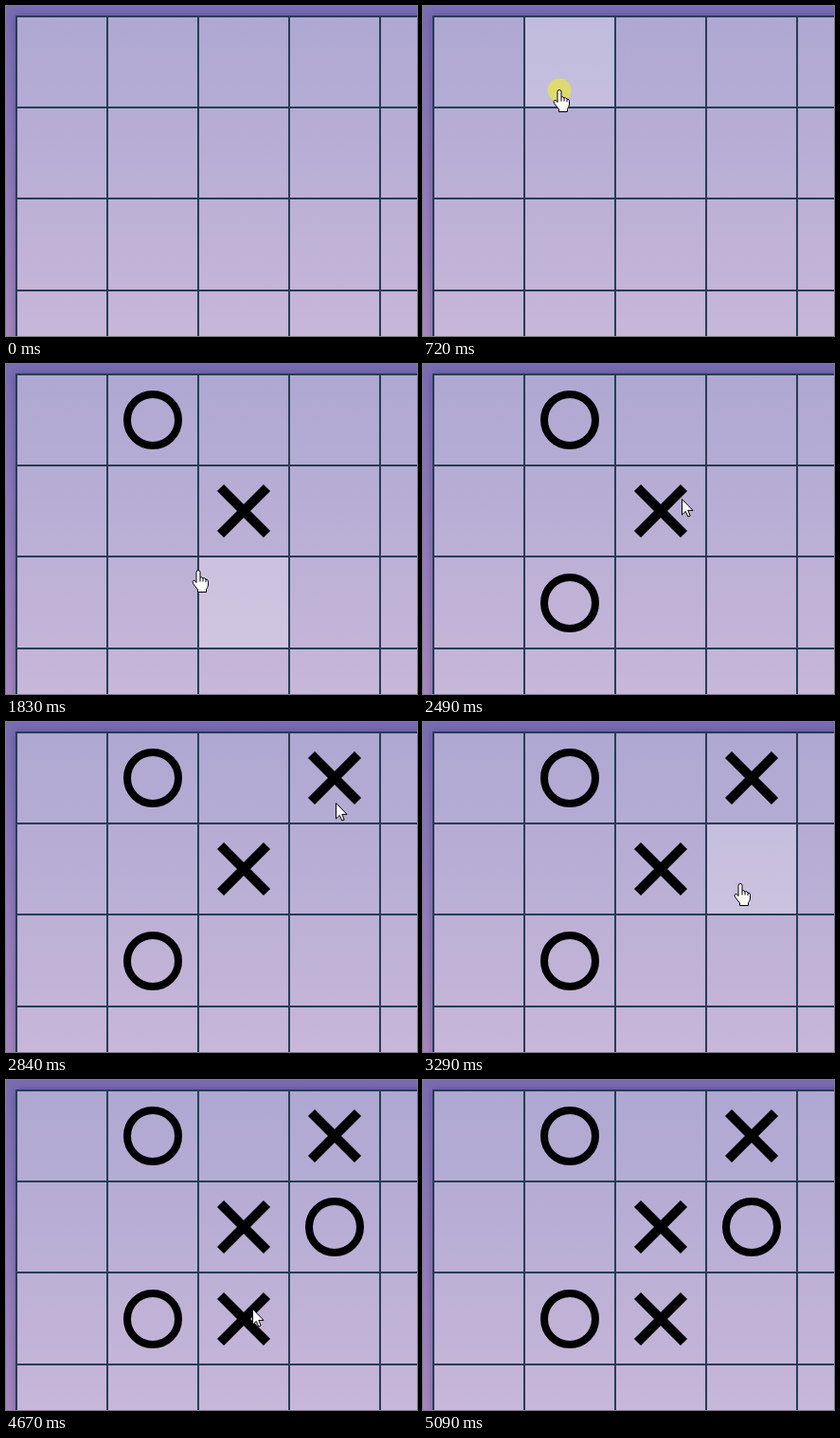
Write an HTML page that moves like this. It is 434x348 px and loops after 5.68 s.

```html
<!DOCTYPE html>
<html lang="en">
<head>
<meta charset="utf-8">
<title>Noughts and crosses</title>
<style>
  html, body { margin: 0; width: 100%; height: 100%; overflow: hidden; }
  svg { display: block; width: 100%; height: 100%; overflow: hidden; }
  #shade { filter: blur(4.5px); }
</style>
</head>
<body>
<svg viewBox="0 0 434 348" preserveAspectRatio="xMinYMin slice">
  <defs>
    <linearGradient id="page" x2="0" y2="1">
      <stop stop-color="#786cb3"/>
      <stop offset="1" stop-color="#a688be"/>
    </linearGradient>
    <linearGradient id="board" x2="0" y2="1">
      <stop stop-color="#aea8d2"/>
      <stop offset=".5" stop-color="#baafd5"/>
      <stop offset="1" stop-color="#c7b7d9"/>
    </linearGradient>
  </defs>
  <rect width="434" height="348" fill="url(#page)"/>
  <rect id="shade" x="10" y="10" width="450" height="370" fill="#2d236e" fill-opacity=".4"/>
  <rect x="10" y="10" width="424" height="338" fill="url(#board)"/>
  <rect id="hover" width="94" height="95" fill="#fff" fill-opacity=".22"/>
  <path id="grid" stroke="#263d55" stroke-width="2"/>
  <g id="marks" fill="none" stroke="#000"></g>
  <circle id="press" r="12.5" fill="#dedb6e"/>
  <g id="hand" fill="#fff" stroke="#000" stroke-linejoin="round">
    <path d="M-2 1.5Q-2 -.5 0 -.5T2 1.5V7Q4 6 5 8Q7 7 8 9Q10.5 8.8 10.5 11.5
             V15Q10 18 8.5 19.5V22.5H-.5V20L-5.5 13.5Q-6.5 11 -5 10.3Q-3.5 10 -2 12.5Z"/>
    <path d="M2 7V11.5M5 8V11.5M8 9V12" fill="none"/>
  </g>
  <path id="arrow" d="M.5 .5V17L4.3 13.4L6.8 19L9.2 18L6.8 12.4H12Z" fill="#fff" stroke="#000"/>
</svg>
<script>
const LOOP = 5680, PRESS = 100, COL = 96, ROW = 96.34;
const $ = id => document.getElementById(id);
const [hover, press, hand, arrow] = ['hover', 'press', 'hand', 'arrow'].map($);

const lineX = col => 11 + COL * col;
const lineY = row => Math.floor(11 + ROW * row);
const cellAt = (x, y) => [Math.floor((x - 11) / COL), Math.floor((y - 11) / ROW)];
const ease = k => k * k * (3 - 2 * k);

// Each glide runs from the previous stop; a press comes just before the next one leaves.
const origin = { x: 220, y: 301 };
const glides = [
  { leave: 230, arrive: 470, x: 144, y: 89, bend: 0 },
  { leave: 820, arrive: 1220, x: 252, y: 150, bend: 0 },
  { leave: 1530, arrive: 2060, x: 157, y: 250, bend: -12 },
  { leave: 2170, arrive: 2720, x: 348, y: 84, bend: -6 },
  { leave: 2820, arrive: 3290, x: 335, y: 171, bend: 0 },
  { leave: 3750, arrive: 4260, x: 259, y: 236, bend: 8 },
  { leave: 4610, arrive: 5090, x: 284, y: 352, bend: 0 }
];
const exit = glides[glides.length - 1].arrive;

const moves = glides.slice(0, -1).map(({ x, y }, i) => {
  const [col, row] = cellAt(x, y);
  return { col, row, placed: glides[i + 1].leave, node: drawMark(col, row, i % 2) };
});

function drawGrid() {
  let d = '';
  for (let i = 0; i < 5; i++) d += `M${lineX(i)} 10V348M10 ${lineY(i)}H434`;
  $('grid').setAttribute('d', d);
}

function drawMark(col, row, cross) {
  const node = document.createElementNS('http://www.w3.org/2000/svg', 'path');
  node.setAttribute('d', cross
    ? 'M-24.5-24.5L24.5 24.5M24.5-24.5L-24.5 24.5'
    : 'M-27 0A27 27 0 0 1 27 0A27 27 0 0 1 -27 0Z');
  node.setAttribute('stroke-width', cross ? 10 : 8);
  place(node, 59 + col * COL, Math.round(59 + row * ROW));
  $('marks').append(node);
  return node;
}

function place(node, x, y) {
  node.setAttribute('transform', `translate(${x} ${y})`);
}

function show(node, on) {
  node.style.display = on ? '' : 'none';
}

function pointerAt(t) {
  const i = glides.findLastIndex(g => t >= g.leave);
  if (i < 0 || t >= exit) return null;
  const from = glides[i - 1] || origin, to = glides[i];
  const k = ease(Math.min(1, (t - to.leave) / (to.arrive - to.leave)));
  const dx = to.x - from.x, dy = to.y - from.y;
  const bow = to.bend * Math.sin(Math.PI * k) / Math.hypot(dx, dy);
  return [from.x + dx * k - dy * bow, from.y + dy * k + dx * bow];
}

function render(t) {
  for (const m of moves) show(m.node, t >= m.placed);
  const pos = pointerAt(t);
  let empty = false;
  if (pos) {
    const [x, y] = pos.map(Math.round);
    const [col, row] = cellAt(...pos);
    empty = !moves.some(m => m.col === col && m.row === row && t >= m.placed);
    hover.setAttribute('x', lineX(col) + 1);
    hover.setAttribute('y', lineY(row) + 1);
    for (const node of [hand, arrow, press]) place(node, x, y);
  }
  show(hover, pos && empty);
  show(hand, pos && empty);
  show(arrow, pos && !empty);
  show(press, moves.some(m => t >= m.placed - PRESS && t < m.placed));
}

const start = performance.now();
function tick() {
  render((performance.now() - start) % LOOP);
  requestAnimationFrame(tick);
}
drawGrid();
tick();
</script>
</body>
</html>
```
